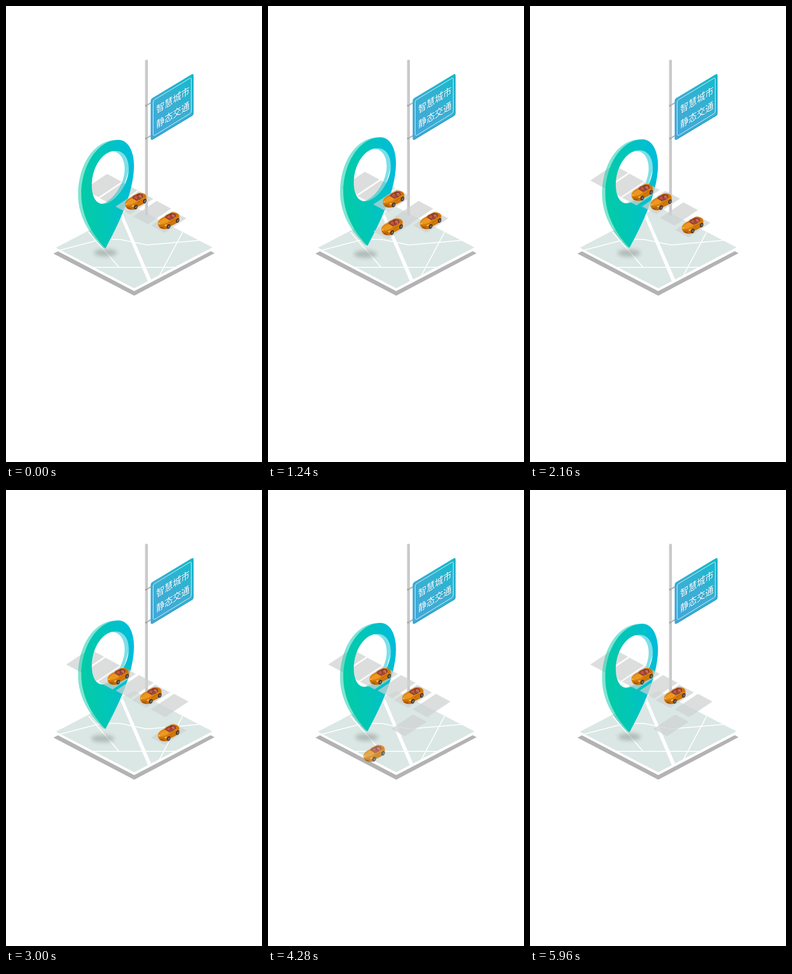
An HTML page that plays this animation: 561x998 px, repeating every 6000 ms.

```html
<!DOCTYPE html>
<html lang="zh">
<head>
<meta charset="utf-8">
<title>智慧城市 静态交通</title>
<style>
html, body { margin: 0; width: 100%; height: 100%; overflow: hidden; background: #fff; }
svg { display: block; width: 100%; height: 100%; }

.tile { fill: #cfd1d2; fill-opacity: .72; }
.free .tile, .free use { fill-opacity: .62; }
.road { fill: none; stroke: #fff; stroke-width: 2; }
.sign-text {
  font: 400 21px "Noto Sans CJK SC", "Noto Sans CJK", sans-serif;
  fill: #fff; text-anchor: middle; filter: drop-shadow(1px 1px 0 #2b86b388);
}

.pin, .shadow { animation: 1s linear infinite alternate; }
.pin { animation-name: bob; }
.shadow { animation-name: drift; }
.row, .free, .arrive, .leave, .drive, .gap { animation: 6s linear infinite; }
.row { animation-name: row; }
.free { animation-name: free; }
.gap { animation-name: gap; }
.arrive { animation-name: arrive, appear; }
.leave { animation-name: leave; }
.drive { animation-name: drive, vanish; }

@keyframes bob { to { transform: translate(0, -7.5px); } }
@keyframes drift { from { transform: translate(218px, 540px); } to { transform: translate(212px, 544px); } }

/* the three left slots make room */
@keyframes row {
  0%, 16.667% { transform: translate(0, 0); }
  33.333%, 100% { transform: translate(-38.5px, -19.5px); }
}
@keyframes free {
  0%, 33.333% { transform: translate(320.5px, 452px); }
  50%, 100% { transform: translate(358.5px, 471.5px); }
}
@keyframes gap {
  0%, 33.333% { opacity: 0; }
  50%, 100% { opacity: 1; }
}
@keyframes arrive {
  0% { transform: translate(350px, 470px); }
  16.667% { transform: translate(269px, 502px); }
  33.333% { transform: translate(281.5px, 424.5px); }
  50%, 100% { transform: translate(317.5px, 450px); }
}
@keyframes appear {
  0% { opacity: 0; }
  8.333%, 100% { opacity: 1; }
}
@keyframes leave {
  0%, 33.333% { transform: translate(356.5px, 470px); }
  50% { transform: translate(356.5px, 531.5px); }
  66.667%, 100% { transform: translate(309px, 512.5px); }
}
@keyframes drive {
  0%, 66.667% { transform: translate(0, 0); }
  76.667%, 100% { transform: translate(-163px, 137px); }
}
@keyframes vanish {
  0% { opacity: 1; }
  66.667% { opacity: 1; animation-timing-function: cubic-bezier(.333, 0, .667, .333); }
  76.667%, 100% { opacity: 0; }
}
</style>
</head>
<body>
<svg viewBox="0 0 561 998" xmlns="http://www.w3.org/2000/svg">
  <defs>
    <linearGradient id="face" gradientUnits="userSpaceOnUse" x1="165" y1="410" x2="281" y2="400">
      <stop offset="0" stop-color="#04cba6"/>
      <stop offset=".45" stop-color="#02c6b9"/>
      <stop offset="1" stop-color="#00bdd9"/>
    </linearGradient>
    <linearGradient id="board" x1=".8" y1="0" x2=".35" y2="1">
      <stop offset="0" stop-color="#15bacd"/>
      <stop offset=".5" stop-color="#38b0d3"/>
      <stop offset="1" stop-color="#41a9d8"/>
    </linearGradient>
    <linearGradient id="pole">
      <stop offset="0" stop-color="#d3d3d3"/>
      <stop offset=".5" stop-color="#cbcbcb"/>
      <stop offset="1" stop-color="#bdbdbd"/>
    </linearGradient>
    <linearGradient id="paint" x1=".2" y1="0" x2=".6" y2="1">
      <stop offset="0" stop-color="#d9800e"/>
      <stop offset=".5" stop-color="#e2860c"/>
      <stop offset="1" stop-color="#b86206"/>
    </linearGradient>
    <filter id="soft" x="-50%" y="-100%" width="200%" height="300%">
      <feGaussianBlur stdDeviation="4.5"/>
    </filter>
    <clipPath id="land"><path d="M281 439.500L453 528.500 281 618 109 529Z"/></clipPath>

    <path id="slot" class="tile" d="M-41.500 8.500L9.500 -25.500 41.500 -8.500 -9.500 25.500Z"/>

    <g id="wheel">
      <ellipse rx="3.600" ry="5.200" transform="rotate(24)" fill="#33261f"/>
      <ellipse cx=".4" rx="1.900" ry="3.200" transform="rotate(24)" fill="#7d766f"/>
    </g>
    <g id="car">
      <path fill="url(#paint)" d="M-23.500 5C-23 -1 -18 -5 -10 -9L-5 -13 5 -18C10 -20 19 -18 22 -14C24 -10 24 -5 22 0L16 6 4 12C1 17 -5 19 -11 18.500C-19 18 -24 13 -23.500 5Z"/>
      <path fill="#ec9820" d="M-21 3C-17 -2 -11 -5 -6 -6L2 -1C-2 5 -12 8 -20 7Z"/>
      <path fill="#8a3c28" d="M-8 -7L-4 -12 6 -17 14 -16 17 -11 13 -6 2 -1Z"/>
      <path fill="#c65340" d="M-5 -7L-1 -12 4 -11 3 -4ZM6 -12L11 -15 14 -11 9 -6Z"/>
      <path fill="none" stroke="#a0616a" stroke-width="1.200" d="M-9 -7L-4 -13M2 -1L8 -8 6 -13"/>
      <path fill="none" stroke="#e3b3a4" stroke-width="1" d="M7 -12C11 -13 13 -10 12 -6"/>
      <path fill="#cf730a" d="M14 -17C19 -17 22 -14 22.500 -9L17 -6 16 -11Z"/>
      <path fill="none" stroke="#a65604" stroke-width="1" d="M3 4L16 -4M-22 9C-18 13 -11 13 -6 11"/>
      <path fill="#ffd27c" d="M-22 5l3 .5 -1 2.500 -2 -1ZM-9 10l5 -2 -1 3 -3 1Z"/>
      <path fill="#8a4a08" d="M-20 13L-10 15.500 -11 17 -18 15.500Z"/>
      <use href="#wheel" x="0" y="12.500"/>
      <use href="#wheel" x="19.500" y="-.5"/>
    </g>
  </defs>

  <!-- map -->
  <path fill="#b3b3b3" d="M104 542L281 449 457 541 281 634Z"/>
  <path fill="#fff" d="M93 526L281 430 469 526 281 624Z"/>
  <g clip-path="url(#land)">
    <path fill="#dbe7e4" d="M109 529L281 439 453 528 281 618Z"/>
    <path class="road" d="M116 535L210 510.500 250 511 309 523 424 513M181 495L247 571M186 572H370M387 495L336 590"/>
    <path fill="#fff" d="M247 452L253 449 320 603 312 605Z"/>
  </g>

  <!-- sign -->
  <rect x="304.500" y="117.500" width="6.200" height="341" rx="3" fill="url(#pole)"/>
  <path stroke="#b4b4b4" stroke-width="3" d="M307 218L320 210.500M307 290L320 282.500"/>
  <circle cx="307" cy="218" r="2.300" fill="#a6a6a6"/>
  <circle cx="307" cy="290" r="2.300" fill="#a6a6a6"/>
  <path fill="url(#board)" d="M317 208Q317 204 320.500 201.500L407 149.500Q411 147.500 411 152V234Q411 238 407.500 240.500L321 292.500Q317 294.500 317 289.500Z"/>
  <path fill="none" stroke="#2a9fc4" stroke-width="1.500" d="M410.300 152V234Q410.300 238 407 240L320.500 292"/>
  <path fill="none" stroke="#fff" stroke-width="1" d="M322.500 211Q322.500 207 325.500 205L402.500 158.500Q406 156.500 406 160.500V229.500Q406 233.500 403 235.500L326.500 282.500Q322.500 284.500 322.500 280.500Z"/>
  <g class="sign-text">
    <text transform="matrix(.87 -.525 0 1 365.700 205.500)" y="8">智慧城市</text>
    <text transform="matrix(.87 -.525 0 1 365.700 238)" y="8">静态交通</text>
  </g>

  <g class="row">
    <use href="#slot" x="212" y="393"/>
    <use href="#slot" x="247" y="412"/>
  </g>

  <!-- pin -->
  <g class="shadow">
    <ellipse rx="25" ry="8" fill="#7e8886" opacity=".45" filter="url(#soft)"/>
  </g>
  <g class="pin">
    <path fill="url(#face)" fill-opacity=".5" fill-rule="evenodd" d="M213 529C183 500 158 460 158 414C158 348 192 297 236 293.500L247 293 262 320 272 350 218 530ZM231 318C249 318 260 334 260 356C260 393 229 434 203 434C187 434 179 416 179 394C179 353 203 318 231 318Z"/>
    <path fill="url(#face)" fill-rule="evenodd" d="M218 530.500C190 502 165 460 165 412C165 348 202 293 246 293C270 293 281 322 280.500 352C279 412 246 478 218 530.500ZM240 317C258 317 269 333 269 355C269 392 238 433 212 433C196 433 188 415 188 393C188 352 212 317 240 317Z"/>
  </g>

  <!-- slots and cars in front -->
  <use href="#slot" class="gap" x="282" y="430.500"/>
  <g class="free"><use href="#slot"/></g>
  <g class="row">
    <use href="#slot" x="281.500" y="430.500"/>
    <use href="#car" x="284.500" y="427.500"/>
  </g>
  <g class="leave">
    <use href="#slot" transform="translate(0 2.500) scale(.93)"/>
    <g class="drive"><use href="#car"/></g>
  </g>
  <g class="arrive">
    <use href="#slot" y="1.500"/>
    <use href="#car"/>
  </g>
</svg>
</body>
</html>
```
